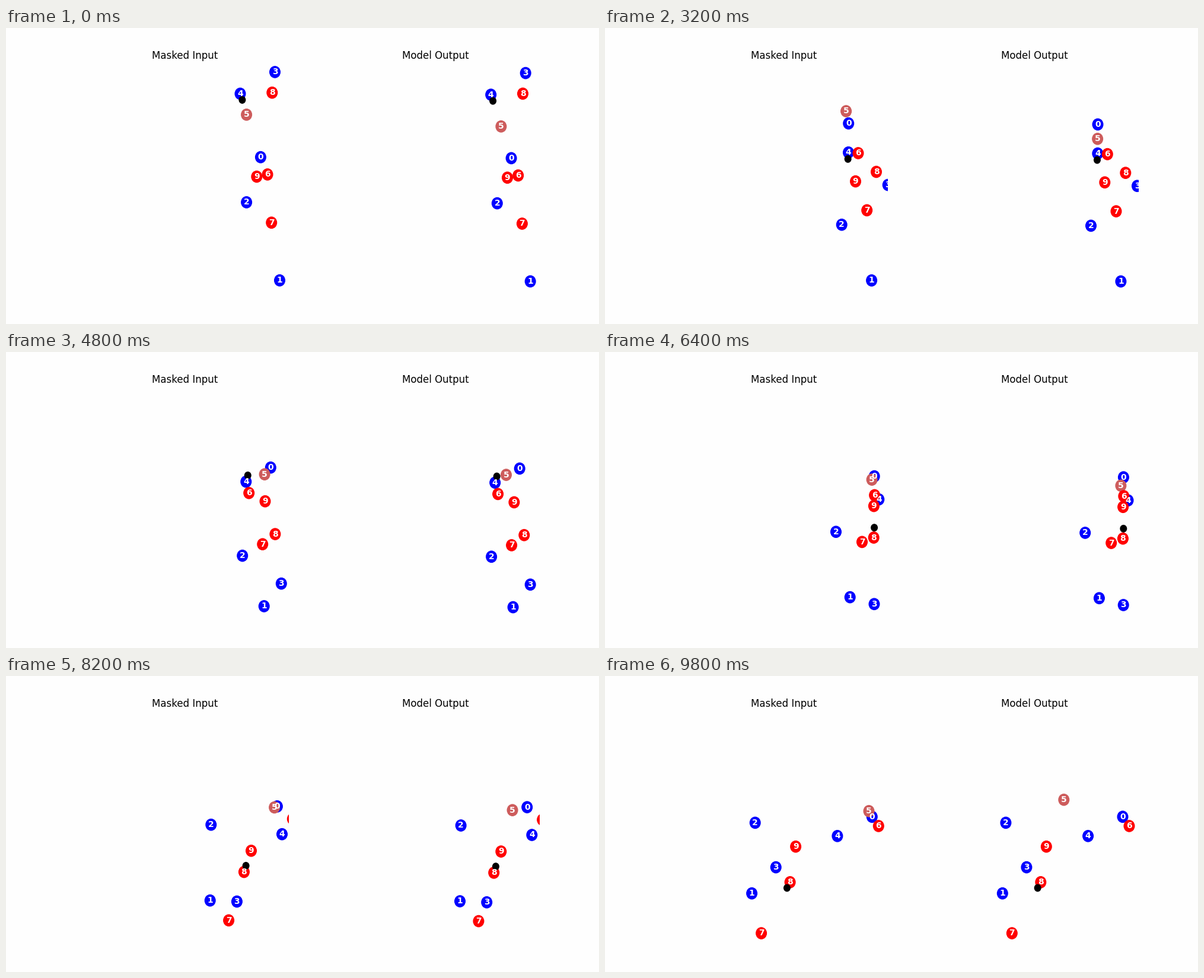
Recreate the animation shown at these times as a matplotlib script. Size 1000x500 px, loop 10000 ms.

```python
import numpy as np
import matplotlib.pyplot as plt
from matplotlib.animation import FuncAnimation
from matplotlib.patches import Ellipse

FRAMES = 50
KEYS = np.array([0, 8, 16, 24, 32, 41, 49])
HOME, AWAY, MASKED = "blue", "red", "indianred"
COLORS = [HOME] * 5 + [MASKED] + [AWAY] * 4 + ["black"]
LABELS = [*"0123456789", ""]

frame_no = np.arange(FRAMES)
progress = frame_no / (FRAMES - 1)


def smooth(values):
    """Cubic Hermite curve through the key positions, one value per frame."""
    v = np.array(values, float)
    slope = np.gradient(v, KEYS, edge_order=2)
    i = np.clip(np.searchsorted(KEYS, frame_no, side="right") - 1, 0, len(KEYS) - 2)
    h = KEYS[i + 1] - KEYS[i]
    u = (frame_no - KEYS[i]) / h
    return ((1 + 2 * u) * (1 - u) ** 2 * v[i] + u * (1 - u) ** 2 * h * slope[i]
            + u * u * (3 - 2 * u) * v[i + 1] + u * u * (u - 1) * h * slope[i + 1])


def run(xs, ys):
    return np.column_stack([smooth(xs), smooth(ys)])


def ball_path(passer, receiver):
    """The ball circles its carrier and is passed on once."""
    u = np.clip((frame_no - 27) / 8, 0, 1)
    w = (u * u * (3 - 2 * u))[:, None]
    angle = np.radians(72 - 21.1 * frame_no)
    orbit = 11 * np.column_stack([np.cos(angle), np.sin(angle)])
    return passer + w * (receiver - passer) + np.abs(1 - 2 * w) * orbit


players = [
    run([429.4, 402.7, 410.7, 446.3, 454.2, 457.4, 450.3],
        [218.2, 154.1, 161.2, 195.2, 210, 220.3, 237.8]),
    run([461.5, 461, 449.6, 435.2, 413.2, 344.2, 247.6],
        [426.3, 427.4, 426.4, 429.4, 414.2, 379.2, 367.2]),
    run([405.6, 398.1, 399.2, 398.7, 389.5, 345.8, 253.2],
        [294.4, 317.2, 332.3, 344.1, 303.8, 251.2, 247.9]),
    run([453.5, 470.7, 477.2, 464.3, 454, 389.4, 288.2],
        [74.4, 137.2, 265.1, 391.2, 425.8, 381, 323.1]),
    run([395, 399.6, 410.5, 404.8, 461.8, 465.5, 391.9],
        [111, 113.6, 210.3, 219, 249, 267.2, 270.3]),
    run([405.6, 397.6, 406.6, 436.1, 450.1, 452.6, 445],
        [146.4, 135, 140.5, 206.6, 215.6, 222, 228.2]),
    run([441, 433.4, 427, 409.7, 454.6, 483.3, 461.3],
        [247.4, 183.3, 211.4, 238.2, 241.9, 241.5, 253.4]),
    run([447.7, 443, 441.7, 432.7, 433.5, 375.6, 263.6],
        [328.8, 305.2, 307.9, 324.7, 320.9, 412.8, 434.5]),
    run([448.8, 455.8, 457.5, 453.9, 453.2, 401.4, 312.1],
        [109.2, 158.3, 243, 307.6, 313.5, 331, 348.3]),
    run([422.8, 416.2, 422.5, 437, 453.4, 413.5, 321.6],
        [251.1, 272, 259.1, 252.2, 260.1, 295.2, 288.2]),
]
given = np.array(players + [ball_path(players[4], players[8])])

# The model repeats the scene with a slight shift and guesses the masked
# player between two opponents, drifting off towards the end.
shift = np.column_stack([422.7 - 2.8 * np.sin(np.pi * progress), 1.7 * (1 - progress ** 8)])
guess = given + shift
guess[5] = (guess[0] + guess[4]) / 2 + np.outer(progress ** 5, [-70, -45])

fig, axes = plt.subplots(1, 2, figsize=(10, 5), dpi=100, facecolor="#fefefe")
parts = []
for ax, title, paths in zip(axes, ("Masked Input", "Model Output"), (given, guess)):
    box = ax.get_position()
    # Data units are stage pixels, with y pointing down.
    ax.set_xlim(box.x0 * 1000, box.x1 * 1000)
    ax.set_ylim(500 - box.y0 * 500, 500 - box.y1 * 500)
    ax.set_title(title, fontsize=12)
    ax.axis("off")
    for i, (label, color, path) in enumerate(zip(LABELS, COLORS, paths)):
        size = 0.05 if label else 0.03
        disc = Ellipse((0, 0), size * box.width * 1000, size * box.height * 500,
                       color=color, linewidth=1, zorder=2 + i / 100)
        ax.add_patch(disc)
        text = ax.text(0, 0, label, color="white", fontsize=10, fontweight="bold",
                       ha="center", va="center", clip_on=True, zorder=4)
        parts.append((disc, text, path))


def draw(frame):
    for disc, text, path in parts:
        disc.set_center(path[frame])
        text.set_position(path[frame])


anim = FuncAnimation(fig, draw, frames=FRAMES, interval=200, repeat=True, blit=False)
plt.show()
```
